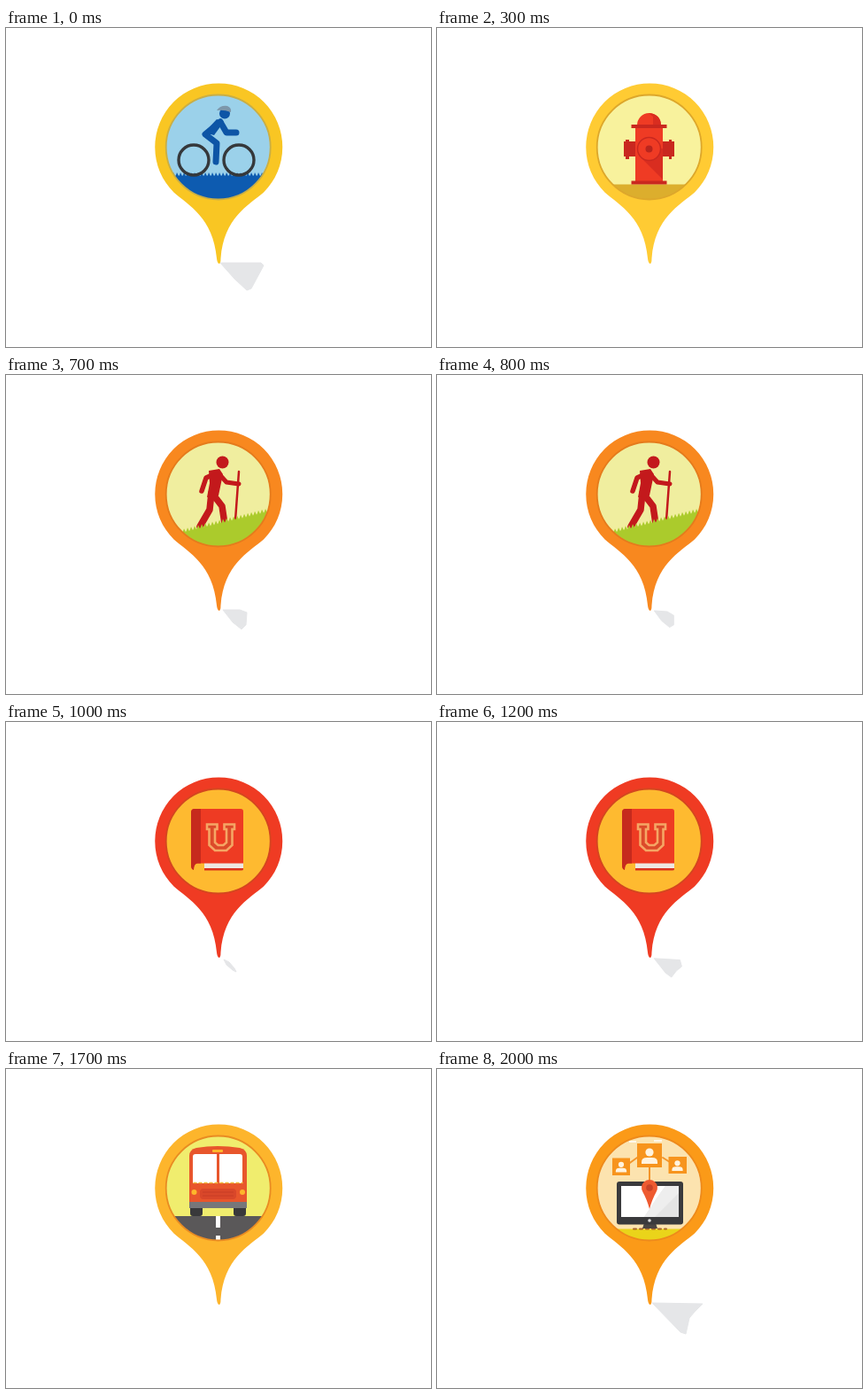
Animation of 480 by 360 pixels, one loop 2100 ms. Source, as an HTML page:

```html
<!DOCTYPE html>
<html lang="en">
<head>
<meta charset="utf-8">
<title>Map pins</title>
<style>
html, body { margin: 0; width: 100%; height: 100%; overflow: hidden; background: #fff; }
svg { display: block; width: 480px; height: 360px; }
.scene { display: none; }
.scene.on { display: inline; }
.line { fill: none; stroke-linecap: round; stroke-linejoin: round; }
</style>
</head>
<body>
<svg viewBox="0 0 480 360">
  <defs>
    <clipPath id="disc"><circle cx="239.7" cy="134.5" r="59"/></clipPath>
    <g id="person">
      <circle cy="-4" r="4.6"/>
      <path d="M-9 9V7Q-9 2-3 2H3Q9 2 9 7V9Z"/>
    </g>
  </defs>
  <polygon id="shadow" fill="#e5e6e8" stroke="#e5e6e8" stroke-linejoin="round"/>
  <path id="pin" d="M189.500 185.500A72 72 0 1 1 291 185.500C274 200 246 214 242.500 260Q242.500 266 240.500 266Q238.500 265 238 260C234 214 206 200 189.500 185.500Z"/>
  <g clip-path="url(#disc)">
    <circle id="back" cx="239.7" cy="134.5" r="59"/>

    <g class="scene">
      <path class="spikes" data-line="180 166 300 166" fill="#0d5bb0"/>
      <g class="line" stroke="#35383b" stroke-width="3.4">
        <circle cx="212" cy="149" r="17"/><circle cx="263" cy="149" r="17"/>
      </g>
      <g class="line" stroke="#0d55a6" stroke-width="7">
        <path d="M242 106L225 120L238 130L237 151"/>
        <path d="M242 106L249 118H260"/>
      </g>
      <path d="M224 118L238 103L246 106L235 121Z" fill="#0d55a6"/>
      <circle cx="247" cy="96.500" r="6" fill="#0d55a6"/>
      <path d="M238 93Q242 87 250 88Q255 90 254 95Q246 92 238 93Z" fill="#7d97aa"/>
    </g>

    <g class="scene">
      <path d="M175 176.500H305V200H175Z" fill="#dcae2d"/>
      <g fill="#c9281f">
        <path d="M211 128H225V145H211ZM254 128H268V145H254Z"/>
        <path d="M213 126H217V148H213ZM262 126H265V148H262Z"/>
      </g>
      <path d="M226 110A13.500 14 0 0 1 253 110ZM224 112H255V173H224Z" fill="#ef3b24"/>
      <path d="M239 96Q253 97 253 110H244V100ZM230 146L255 171V136H250Z" fill="#d92d20"/>
      <path d="M219.500 109H259.500V113H219.500ZM219.500 172.500H259.500V176.500H219.500Z" fill="#c9281f"/>
      <circle cx="239.500" cy="136.500" r="13" fill="#ef3b24" stroke="#c9281f" stroke-width="1.500"/>
      <circle cx="239.500" cy="136.500" r="4" fill="#b9251d"/>
    </g>

    <g class="scene">
      <g class="line" stroke="#c3191c">
        <path d="M263 109L259 164" stroke-width="2.500"/>
        <path d="M237 111L226 116L221 131" stroke-width="5.500"/>
        <path d="M240 111L249 121L263 123" stroke-width="5"/>
        <path d="M232 133L230 152L219 171" stroke-width="7.500"/>
        <path d="M234 135L244 148L247 168" stroke-width="7.500"/>
      </g>
      <path d="M229 108L241 106L245 112L240 136L227 138L230 122Z" fill="#c3191c"/>
      <circle cx="244.500" cy="98.500" r="7" fill="#c3191c"/>
      <path class="spikes" data-line="180 181 304 151" fill="#abcb2c"/>
    </g>

    <g class="scene">
      <path d="M224 159H268V165.500H224Z" fill="#eee8e2"/>
      <path d="M224 165H268V166Q268 167.500 266 167.500H224Z" fill="#d9331f"/>
      <path d="M213 98H265Q268 98 268 101V159.500H216Q212 160 212 167Q209 166 209 162V102Q209 98 213 98Z" fill="#ee3b23"/>
      <path d="M213 98H220V159.500H216Q212 160 212 167Q209 166 209 162V102Q209 98 213 98Z" fill="#c62a1d"/>
      <path d="M227 115.500H238.500V121H236V136L239.500 139H245.500L249 136V121H246.500V115.500H258V121H255.500V139L249 145H236L229.500 139V121H227Z" fill="#dc4a2a" stroke="#f5a664" stroke-width="2.600"/>
    </g>

    <g class="scene">
      <path d="M222 109H256V124H222Z" fill="#f4931f"/>
      <path d="M222 122H228V157L222 149ZM250 122H256V149L250 157Z" fill="#e8452a"/>
      <path d="M226 121H252L251 177H226Z" fill="#f4931f"/>
      <path d="M241 123H246L241 177H236ZM247 123H250V155L246 175Z" fill="#fcab32"/>
      <path d="M235 112H245L246 122H235Z" fill="#f4931f"/>
      <path d="M224 108L234 103V121L224 119ZM244 103L255 108V121L244 122Z" fill="#c2211e"/>
      <path d="M235 92H243V102L245 104V110L239 114L234 110V104L235 102Z" fill="#e93b25"/>
      <path d="M231 92Q230 82 239 82Q248 82 247 92L244 95H234Z" fill="#c2211e"/>
      <path d="M222 177H257L258 185L261 188V194H217V188L221 185Z" fill="#e3821f"/>
      <path d="M242 177H257L258 185L261 188V194H245V182H242Z" fill="#c2211e"/>
    </g>

    <g class="scene">
      <path d="M175 166H305V200H175Z" fill="#5a5859"/>
      <path d="M237 166H242V179H237ZM237 188H242V196H237Z" fill="#fff"/>
      <path d="M208 154H222V163Q222 166 219 166H211Q208 166 208 163ZM257 154H271V163Q271 166 268 166H260Q257 166 257 163Z" fill="#39393b"/>
      <path d="M207 151V98Q207 91 215 89Q239 85 264 89Q272 91 272 98V151Z" fill="#e8562c"/>
      <path d="M207 150H272V157H207Z" fill="#77777a"/>
      <path d="M214 96H238V129H211V99Q211 96 214 96ZM241 96H264Q267 96 267 99V129H241Z" fill="#fff"/>
      <path class="line" d="M212 128.500H267" stroke="#efb83a" stroke-width="1.500" stroke-dasharray="3 3"/>
      <rect x="233" y="91" width="12" height="3" rx="1" fill="#fdb62b"/>
      <rect x="219" y="135" width="41" height="12" rx="4" fill="#d9472a"/>
      <path d="M222 139H257M222 143H257" stroke="#c83d25"/>
      <g fill="#fdb62b"><circle cx="212.500" cy="139" r="3"/><circle cx="267" cy="139" r="3"/></g>
    </g>

    <g class="scene">
      <path d="M175 180.500H305V200H175Z" fill="#ead41a"/>
      <path class="line" d="M222 180.500H259" stroke="#a8642a" stroke-width="2" stroke-dasharray="3 4"/>
      <path class="line" d="M240 110V127M226 100L215 108M255 100L266 107" stroke="#f3952b" stroke-width="2"/>
      <path d="M226 84H254V111H226ZM198 100.500H218V120H198ZM261.500 99H282V118H261.500Z" fill="#f7941d"/>
      <g fill="#fff3df">
        <use href="#person" transform="translate(240 98)"/>
        <use href="#person" transform="translate(208 110.500) scale(.68)"/>
        <use href="#person" transform="translate(271.500 109) scale(.68)"/>
      </g>
      <path d="M217 82H225M245 81H254" stroke="#fff" stroke-width="1.500"/>
      <path d="M234 174H247L249 180H232Z" fill="#4b4543"/>
      <rect x="203" y="127" width="75" height="48.500" rx="3" fill="#3a3a3c"/>
      <path d="M208 132H273V167H208Z" fill="#fff"/>
      <path d="M258 132H273V167H234Z" fill="#e4e4e4"/>
      <path d="M249 144L258 132H273V140L246 167H234Z" fill="#eee"/>
      <circle cx="240" cy="171" r="1.800" fill="#ddd"/>
      <path d="M240 158Q237 147 232.500 139A9 9 0 1 1 247.500 139Q243 147 240 158Z" fill="#ee5a30"/>
      <circle cx="240" cy="134" r="3.800" fill="#c94328"/>
    </g>
  </g>
  <circle id="ring" cx="239.700" cy="134.500" r="59" fill="none" stroke-width="1.800"/>
</svg>
<script>
const $ = id => document.getElementById(id);
const scenes = [...document.querySelectorAll('.scene')];
const none = '243 265 243 265 243 265 243 265 243 265 243 265';

// start time, pin, disc and ring colours, shadow outline
const looks = [
  [0, '#f9c623', '#9bd1ea', '#c9ae45', '242 265 288 265 291 268 277 294 272 296 258 283'],
  [300, '#ffcb33', '#f8f29d', '#dda72b', none],
  [700, '#f8881f', '#f0ee9f', '#e57b1c', '245 265 264 265 272 268 271 282 266 287 256 279'],
  [1000, '#ef3b23', '#feba30', '#d4461f', '246 268 252 271 258 278 260 282 256 280 249 274'],
  [1500, '#f23c23', '#ffffff', '#b9261d', '244 265 308 265 304 273 286 279 278 300 272 297'],
  [1700, '#fdb52c', '#f0ed6e', '#e98b22', none],
  [2000, '#fb9a18', '#fce3af', '#ee8a1b', '243 264 300 265 291 274 285 281 281 299 275 297']
].map(([start, pin, disc, ring, pts]) => ({ start, pin, disc, ring, pts: pts.split(' ').map(Number) }));

// a jagged upper edge over a solid ground
for (const el of document.querySelectorAll('.spikes')) {
  const [x0, y0, x1, y1] = el.dataset.line.split(' ').map(Number);
  let d = `M${x0} 200`;
  for (let x = x0; x < x1; x += 4) {
    const y = y0 + (y1 - y0) * (x - x0) / (x1 - x0);
    d += `L${x} ${y}L${x + 1} ${y - 3}L${x + 3} ${y + 1}`;
  }
  el.setAttribute('d', d + `L${x1} 200Z`);
}

function draw(now) {
  const t = Math.floor(now % 2100 / 100) * 100;
  const i = looks.findLastIndex(look => look.start <= t);
  const a = looks[i], b = looks[(i + 1) % looks.length];
  const k = (t - a.start) / ((b.start || 2100) - a.start);
  scenes.forEach((s, n) => s.classList.toggle('on', n === i));
  $('pin').setAttribute('fill', a.pin);
  $('back').setAttribute('fill', a.disc);
  $('ring').setAttribute('stroke', a.ring);
  const pts = a.pts.map((v, n) => v + (b.pts[n] - v) * k);
  $('shadow').setAttribute('points', pts.join(' '));
  $('shadow').style.display = k === 0 && a.pts[0] === a.pts[2] ? 'none' : '';
}

const begin = performance.now();
function loop() {
  draw(performance.now() - begin);
  requestAnimationFrame(loop);
}
loop();
</script>
</body>
</html>
```
